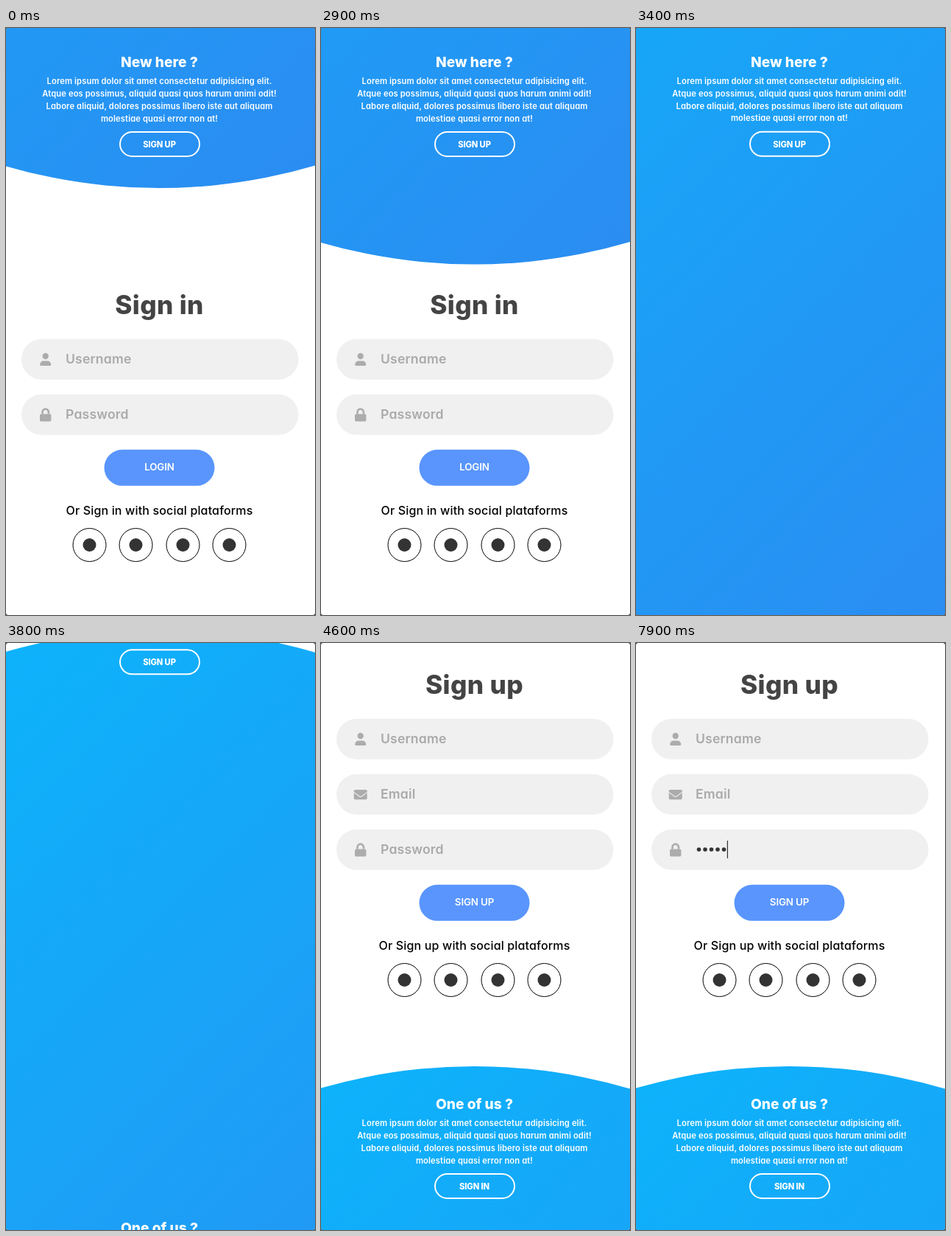
Animation of 420x796 px, one loop 8000 ms. Source, as an HTML page:

```html
<!DOCTYPE html>
<html lang="en">
<head>
<meta charset="utf-8">
<title>Sign in / Sign up</title>
<style>
  html, body { margin: 0; width: 100%; height: 100%; overflow: hidden; background: #222; }
  svg { display: block; width: 420px; height: 796px; border-radius: 3px; background: #fff; }
  text {
    font-family: Inter, "Open Sans", sans-serif;
    font-feature-settings: "cv11";
    text-anchor: middle;
    letter-spacing: .01em;
    white-space: pre;
  }
  .title { font-size: 35.2px; font-weight: 800; fill: #444; }
  .hint { font-size: 17.6px; font-weight: 600; fill: #aaa; text-anchor: start; }
  .icon { fill: #acacac; }
  .button { font-size: 13.33px; font-weight: 600; fill: #fff; letter-spacing: -.01em; }
  .social { font-size: 16px; font-weight: 500; }
  .panel text { fill: #fff; }
  .panel .heading { font-size: 19.2px; font-weight: 800; letter-spacing: 0; }
  .panel .copy { font-size: 11.2px; font-weight: 600; }
  .panel .action { font-size: 11.2px; font-weight: 800; letter-spacing: -.01em; }
</style>
</head>
<body>
<svg id="stage" viewBox="0 0 420 796"></svg>
<script>
const CENTER = 208.5;
const FORM_TRAVEL = 281.5;
const CIRCLE_TRAVEL = 1857;
const PANEL_TRAVEL = 300;

const icons = {
  Username: `<circle cy="-4.6" r="4.2"/>
    <path d="M-7.5 7v-.5a4.5 4.5 0 0 1 4.5-4.5h6a4.5 4.5 0 0 1 4.5 4.5v.5q0 1.5-1.5 1.5h-12q-1.5 0-1.5-1.5z"/>`,
  Email: `<rect x="-9" y="-6.7" width="18" height="13.4" rx="1.7"/>
    <path d="M-9-3.2L-1.5 2.4q1.5 1 3 0L9-3.2" fill="none" stroke="#f0f0f0" stroke-width="1.1"/>`,
  Password: `<rect x="-7.7" y="-1.2" width="15.4" height="10" rx="1.6"/>
    <path d="M-4.2-1v-2.8a4.2 4.2 0 0 1 8.4 0V-1" fill="none" stroke="#acacac" stroke-width="2.6"/>`
};

const label = (cls, y, text, x = CENTER) => `<text class="${cls}" x="${x}" y="${y}">${text}</text>`;

const field = (name, y) => `
  <g id="${name}">
    <rect x="21" y="${y - 27.5}" width="376.5" height="55" rx="27.5" fill="#f0f0f0"/>
    <g class="icon" transform="translate(53.7 ${y + .3})">${icons[name]}</g>
    ${label("hint", y + 6, name, 81)}
  </g>`;

const badge = (x, y) => `
  <circle cx="${x}" cy="${y}" r="22.5" fill="none" stroke="#000"/>
  <circle cx="${x}" cy="${y}" r="9" fill="#333"/>`;

function form(id, title, names, button, titleY) {
  const buttonY = titleY + 71 + names.length * 75;
  return `<g id="${id}">
    ${label("title", titleY + 13, title)}
    ${names.map((name, i) => field(name, titleY + 74.3 + i * 75)).join("")}
    <rect x="133.5" y="${buttonY - 24.2}" width="150" height="49" rx="24.5" fill="#5995fd"/>
    ${label("button", buttonY + 4, button)}
    ${label("social", buttonY + 63.5, `Or ${title} with social plataforms`)}
    ${[113.5, 176.5, 240.5, 303.5].map(x => badge(x, buttonY + 105)).join("")}
  </g>`;
}

const copy = [
  "Lorem ipsum dolor sit amet consectetur adipisicing elit.",
  "Atque eos possimus, aliquid quasi quos harum animi odit!",
  "Labore aliquid, dolores possimus libero iste aut aliquam",
  "molestiae quasi error non at!"
];

const panel = (id, heading, action) => `
  <g id="${id}" class="panel">
    ${label("heading", 53, heading)}
    ${copy.map((line, i) => label("copy", 76 + i * 16.9, line)).join("")}
    <rect x="155" y="141" width="108" height="33" rx="16.5" fill="none" stroke="#fff" stroke-width="2"/>
    ${label("action", 162, action)}
  </g>`;

stage.innerHTML = `
  <defs>
    <linearGradient id="sky" x2="1" y2="1">
      <stop stop-color="#04befe"/><stop offset="1" stop-color="#3481ee"/>
    </linearGradient>
  </defs>
  ${form("signIn", "Sign in", ["Username", "Password"], "LOGIN", 375)}
  ${form("signUp", "Sign up", ["Username", "Email", "Password"], "SIGN UP", 56)}
  <circle id="cover" cx="${CENTER}" cy="-533" r="750" fill="url(#sky)"/>
  ${panel("newHere", "New here ?", "SIGN UP")}
  ${panel("oneOfUs", "One of us ?", "SIGN IN")}
  <rect id="tap" x="154" y="140" width="110" height="35" fill="rgba(51,181,229,.4)"/>
  <g id="typing" fill="#333">
    ${[0, 1, 2, 3, 4].map(i => `<circle class="dot" cx="${85.5 + i * 8.5}" cy="280" r="2.8"/>`).join("")}
    <rect id="caret" y="268" width="1.2" height="24"/>
  </g>`;

const find = selector => stage.querySelector(selector);
const [signInForm, signUpForm, cover, newHerePanel, oneOfUsPanel, tapFlash, caretBar] =
  ["#signIn", "#signUp", "#cover", "#newHere", "#oneOfUs", "#tap", "#caret"].map(find);
const passwordHint = find("#signUp #Password .hint");
const dots = [...stage.querySelectorAll(".dot")];

const clamp = v => Math.min(1, Math.max(0, v));
const moveY = (el, y) => el.setAttribute("transform", `translate(0 ${y})`);
const show = (el, on) => el.setAttribute("visibility", on ? "visible" : "hidden");

// cubic-bezier(.42, 0, .58, 1)
function easeInOut(x) {
  if (x <= 0 || x >= 1) return clamp(x);
  let low = 0, high = 1, s;
  for (let i = 0; i < 24; i++) {
    s = (low + high) / 2;
    const at = 1.26 * (1 - s) ** 2 * s + 1.74 * (1 - s) * s * s + s ** 3;
    if (at < x) low = s; else high = s;
  }
  return s * s * (3 - 2 * s);
}

function draw(t) {
  const phase = (start, duration) => (t - start) / duration;
  const sweep = easeInOut(phase(2562, 2035));
  const slide = easeInOut(phase(3417, 1000));
  const swap = easeInOut(phase(3382, 900));
  const fade = clamp(phase(3282, 200));

  moveY(cover, CIRCLE_TRAVEL * sweep);
  moveY(signInForm, -FORM_TRAVEL * slide);
  moveY(signUpForm, FORM_TRAVEL * (1 - slide));
  signInForm.setAttribute("opacity", 1 - fade);
  signUpForm.setAttribute("opacity", fade);
  moveY(newHerePanel, -PANEL_TRAVEL * swap);
  moveY(oneOfUsPanel, 579 + PANEL_TRAVEL * (1 - swap));
  show(tapFlash, t >= 2400 && t < 2600);

  const typed = Math.min(5, Math.max(0, Math.floor((t - 7400) / 100)));
  dots.forEach((dot, i) => show(dot, i < typed));
  show(passwordHint, !typed);
  show(caretBar, t >= 5700 && t < 6200 || t >= 6700);
  caretBar.setAttribute("x", 81.3 + typed * 8.5);
}

// The picture advances ten times a second.
function tick() {
  draw(Math.floor(performance.now() % 8000 / 100) * 100);
  requestAnimationFrame(tick);
}
tick();
</script>
</body>
</html>
```
